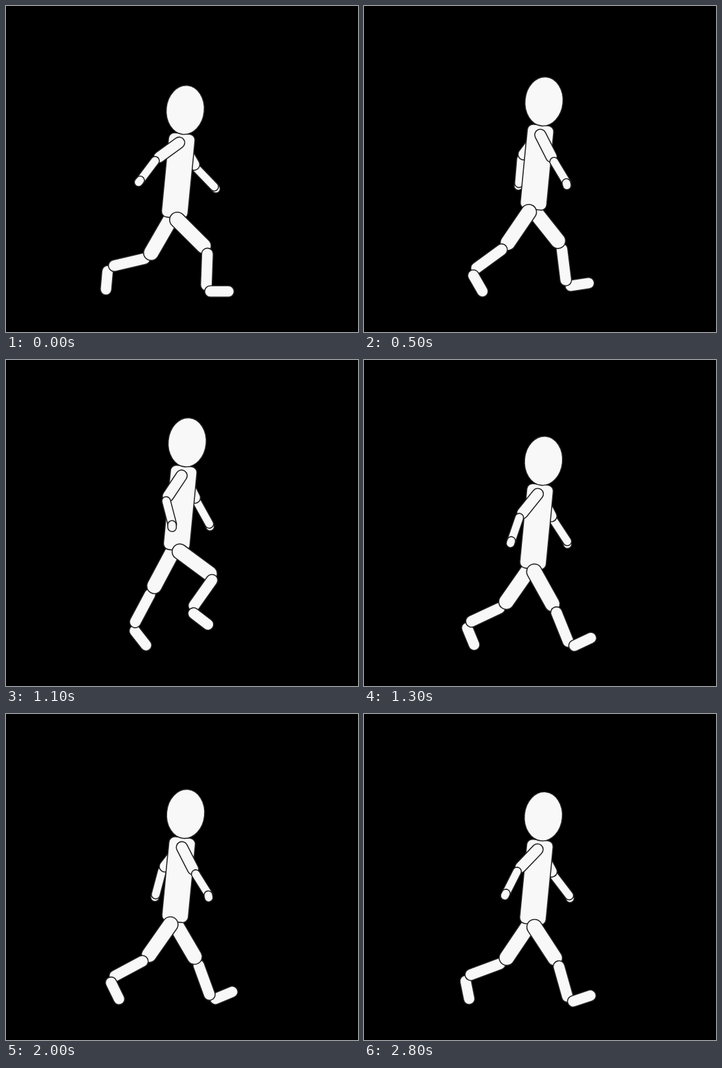
Animation, 544 px wide and 504 px high, one loop 2900 ms. Source, as an HTML page with a canvas:

```html
<!DOCTYPE html>
<html lang="en">
<head>
<meta charset="utf-8">
<title>Walk cycle</title>
<style>
  html, body { margin: 0; width: 100%; height: 100%; overflow: hidden; background: #000; }
  canvas { display: block; width: 544px; height: 504px; }
</style>
</head>
<body>
<canvas id="stage" width="544" height="504"></canvas>
<script>
const ctx = document.getElementById('stage').getContext('2d');
const CYCLE = 1450, STRIDE = CYCLE / 2, LOOP = 2 * CYCLE, STEP = 100;
const RAD = Math.PI / 180, TILT = 5.5 * RAD;

// Key poses of one body side. Angles run from straight down, forward positive:
// leg is thigh, shin, foot; arm is upper arm, forearm, hand.
const POSES = [
  { at: 0, leg: [45, -2, 90], arm: [-54, -37, -40] },       // foot flat
  { at: 150, leg: [12, -2, 91], arm: [-18, -12, -10] },     // support
  { at: 375, leg: [-28, -28, 38], arm: [27, 29, 20] },      // heel up
  { at: 550, leg: [-35, -62, 26], arm: [27, 32, 11] },      // push off
  { at: 725, leg: [-30, -77, -5], arm: [30, 44, 41] },      // toe off
  { at: 875, leg: [9, -85, -1], arm: [15, 27, 26] },        // swing
  { at: 1120, leg: [54, -30, 58], arm: [-35, 13, 0] },      // knee up
  { at: 1300, leg: [29, 22, 115], arm: [-39, -19, -18] }    // reach
];

// Height of the head centre, once per stride
const BOB = [
  { at: 0, y: 160.6 }, { at: 150, y: 143 }, { at: 375, y: 127.3 }, { at: 550, y: 154.4 }
];

// Segments: capsule axis from and to, radius, distance to the next joint
const LEG = [
  { from: 8.9, to: 66, r: 11.9, next: 75 },
  { from: 6, to: 54, r: 9, next: 64 },
  { from: 6.5, to: 34.5, r: 8.8, next: 0 }
];
const ARM = [
  { from: 3, to: 41, r: 8.7, next: 47.2 },
  { from: 2.5, to: 40, r: 6.7, next: 38 },
  { from: 2.5, to: 6.3, r: 6.6, next: 0 }
];

// Smooth periodic curve through the keys, without overshoot
function sample(keys, value, period, time) {
  const n = keys.length, t = time % period;
  const key = i => {
    const turn = Math.floor(i / n), k = keys[i - turn * n];
    return [k.at + turn * period, value(k)];
  };
  const slope = i => {
    const [a, b] = [key(i), key(i + 1)];
    return (b[1] - a[1]) / (b[0] - a[0]);
  };
  const tangent = i => {
    const p = slope(i - 1), q = slope(i);
    return p * q <= 0 ? 0 : 2 * p * q / (p + q);
  };
  let i = n - 1;
  while (keys[i].at > t) i--;
  const [t0, v0] = key(i), [t1, v1] = key(i + 1);
  const h = t1 - t0, u = (t - t0) / h, w = 1 - u;
  return v0 * w * w * (1 + 2 * u) + v1 * u * u * (3 - 2 * u)
    + h * u * w * (w * tangent(i) - u * tangent(i + 1));
}

function paint() {
  ctx.fill();
  ctx.stroke();
}

function capsule({ x, y, angle, from, to, r }) {
  ctx.save();
  ctx.translate(x, y);
  ctx.rotate(-angle);
  ctx.beginPath();
  ctx.arc(0, from, r, Math.PI, 0);
  ctx.arc(0, to, r, 0, Math.PI);
  ctx.closePath();
  paint();
  ctx.restore();
}

function limb(name, segments, x, y, time, far) {
  const parts = segments.map((segment, i) => {
    const angle = sample(POSES, pose => pose[name][i], CYCLE, time) * RAD;
    const part = { ...segment, x, y, angle };
    x += segment.next * Math.sin(angle);
    y += segment.next * Math.cos(angle);
    return part;
  });
  if (far) parts.reverse();
  parts.forEach(capsule);
}

function torso(x, y) {
  ctx.save();
  ctx.translate(x, y);
  ctx.rotate(TILT);
  ctx.beginPath();
  ctx.roundRect(-20.5, -65.5, 41, 131, 9);
  paint();
  ctx.restore();
}

function head(x, y) {
  ctx.beginPath();
  ctx.ellipse(x, y, 29.4, 38, TILT, 0, 2 * Math.PI);
  paint();
}

function draw(time) {
  const y = sample(BOB, key => key.y, STRIDE, time);
  const x = 277 + (160.6 - y) * 0.09;
  const other = time + STRIDE;

  ctx.fillStyle = '#000';
  ctx.fillRect(0, 0, 544, 504);
  ctx.fillStyle = '#f8f8f8';
  ctx.strokeStyle = '#222';
  ctx.lineWidth = 1.6;

  limb('arm', ARM, x - 6.7, y + 49, other, true);
  limb('leg', LEG, x - 19.6, y + 163.7, other, true);
  torso(x - 10.8, y + 101.7);
  head(x, y);
  limb('leg', LEG, x - 18.5, y + 163.7, time, false);
  limb('arm', ARM, x - 7, y + 49, time, false);
}

function tick() {
  const now = performance.now() % LOOP;
  draw(Math.floor(now / STEP) * STEP);
  requestAnimationFrame(tick);
}
tick();
</script>
</body>
</html>
```
